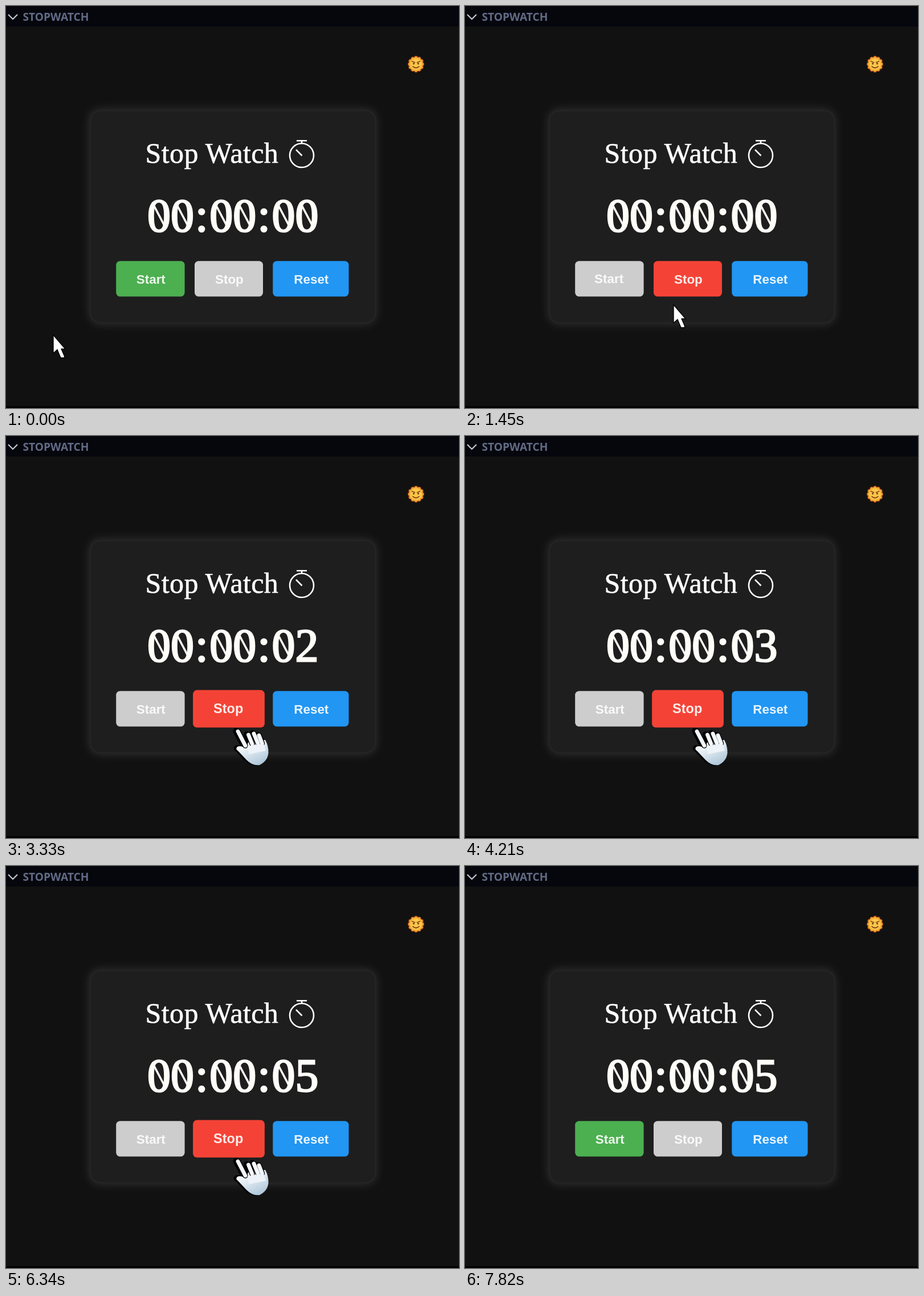
Recreate the animation shown at these times as an HTML page. Size 795 by 705 pixels, loop 7.9 s.

```html
<!DOCTYPE html>
<html lang="en">
<head>
<meta charset="utf-8">
<title>Stop Watch</title>
<style>
  html, body { margin: 0; width: 100%; height: 100%; overflow: hidden; background: #111; }
  svg { display: block; width: 100vw; height: 100vh; }
  .bar { font: 700 19.2px "Open Sans", sans-serif; fill: #626b86; }
  .title { font: 50px "Liberation Serif", serif; letter-spacing: .4px; fill: #fff; stroke: #fff; stroke-width: .6; }
  .time { font: 82px "Liberation Serif", serif; fill: #fffdf8; stroke: #fffdf8; stroke-width: 2.6; }
  .btn text { font: bold 22.4px "Liberation Sans", Arial, sans-serif; text-anchor: middle; }
</style>
</head>
<body>
<svg viewBox="0 0 795 705">
  <defs>
    <filter id="blur" x="-10%" y="-10%" width="120%" height="120%"><feGaussianBlur stdDeviation="8"/></filter>
    <linearGradient id="skin" x1=".2" y1="0" x2=".8" y2="1">
      <stop offset=".2" stop-color="#f4f8fb"/><stop offset="1" stop-color="#a9c3d6"/>
    </linearGradient>
    <path id="palm" d="M4 33Q0 37 5 40L20 56Q31 67 43 65Q57 58 58.5 44Q59 32 53 21L24 24L18 35Q9 30 4 33Z"/>
    <path id="fingers" d="M5 6L18 31M23.5 12L30 28M33 10L40 27M42 13L47.5 27"/>
  </defs>

  <rect width="795" height="705" fill="#111"/>
  <rect width="795" height="36" fill="#06070d"/>
  <rect y="702" width="795" height="3" fill="#000"/>
  <path d="M4 15L12 23L20 15" fill="none" stroke="#c3c6ce" stroke-width="2.2"/>
  <text class="bar" x="29.5" y="25.5">STOPWATCH</text>

  <g transform="translate(719.5 102)">
    <g id="rays" fill="#ee9430" stroke="#7a3010" stroke-width="1"></g>
    <circle r="12" fill="#f6b038"/>
    <circle r="9.8" fill="#fbc84a"/>
    <path d="M-7 -5L-2 -3M7 -5L2 -3M-5.5 4Q0 9 5.5 4" fill="none" stroke="#8a4715" stroke-width="1.7" stroke-linecap="round"/>
    <circle cx="-4" cy="-1" r="1.5" fill="#6b3510"/><circle cx="4" cy="-1" r="1.5" fill="#6b3510"/>
  </g>

  <rect x="146" y="181" width="504" height="377" rx="20" fill="#fff" opacity=".13" filter="url(#blur)"/>
  <rect x="148" y="183.5" width="500.5" height="372" rx="18" fill="#1e1e1e" stroke="#252525" stroke-width="2"/>

  <text class="title" x="244.5" y="275">Stop Watch</text>
  <g fill="none" stroke="#fff" stroke-width="2.6">
    <circle cx="519" cy="262" r="21"/>
    <path d="M510 236.3H528M519 236V241M519.5 262.5L509 252"/>
  </g>

  <text class="time" id="time" y="394.5"></text>
  <g id="slashes" stroke="#fffdf8" stroke-width="3.6"></g>

  <g id="buttons"></g>

  <g id="cursor">
    <path id="arrow" d="M0 0V32L7 25.5L13 40H19.5V37L14 24.5H21Z" fill="#fff" stroke="#000" stroke-width="1.3"/>
    <g id="hand" stroke-linecap="round" stroke-linejoin="round">
      <g transform="translate(-3 -.5)" stroke="#000">
        <use href="#palm" stroke-width="3"/>
        <use href="#fingers" stroke-width="11"/>
      </g>
      <use href="#palm" fill="url(#skin)"/>
      <use href="#fingers" stroke="#000" stroke-width="9.4"/>
      <use href="#fingers" stroke="#f4f8fb" stroke-width="6.8"/>
      <path d="M22 32L50 27L54 40L24 46Z" fill="#edf3f8"/>
    </g>
  </g>
</svg>
<script>
const LOOP = 7900, STEP = 97.7;
const START_AT = 1130, STOP_AT = 6390;
const NS = "http://www.w3.org/2000/svg";
const $ = id => document.getElementById(id);
const clamp = (v, lo = 0, hi = 1) => Math.min(hi, Math.max(lo, v));
const smooth = u => u * u * (3 - 2 * u);
const ramp = (t, from, to) => smooth(clamp((t - from) / (to - from)));
const pulse = (t, a, b, c, d) => ramp(t, a, b) - ramp(t, c, d);
const mix = (a, b, k) => `rgb(${a.map((v, i) => Math.round(v + (b[i] - v) * k))})`;

function add(parent, tag, attrs) {
  const el = document.createElementNS(NS, tag);
  for (const k in attrs) el.setAttribute(k, attrs[k]);
  return parent.appendChild(el);
}

for (let i = 0; i < 12; i++) {
  const a = i * Math.PI / 6;
  add($("rays"), "circle", { cx: 11 * Math.cos(a), cy: 11 * Math.sin(a), r: 3.4 });
}

// Left edges of the six digits; a colon follows each pair.
const digitX = [0, 1, 2, 3, 4, 5].map(i => 248 + i * 41 + Math.floor(i / 2) * 27.3);
const slashes = digitX.map(x =>
  add($("slashes"), "path", { d: `M${x + 10.5} 348L${x + 30.5} 386` }));
$("time").setAttribute("x", digitX.flatMap((x, i) => i === 1 || i === 3 ? [x, x + 43] : [x]));

const GREY = [205, 205, 205];
function makeButton(label, x, w, color) {
  const g = add($("buttons"), "g", { class: "btn" });
  const box = add(g, "rect", { rx: 7 });
  const text = add(g, "text", { fill: "#fff", "fill-opacity": .9 });
  text.textContent = label;
  return (on, hover, shift = hover) => {
    const grow = 2.9 * hover;
    box.setAttribute("x", x - grow);
    box.setAttribute("y", 447.2 - 1.6 * hover);
    box.setAttribute("width", w + 2 * grow);
    box.setAttribute("height", 62.4 + 3.2 * hover);
    box.setAttribute("fill", mix(GREY, color, on));
    text.setAttribute("transform",
      `translate(${x + w / 2 + .9 - 1.7 * shift} ${487.3 - 1.6 * shift}) scale(${1 + .05 * hover})`);
  };
}
const startBtn = makeButton("Start", 193.2, 120.4, [76, 175, 80]);
const stopBtn = makeButton("Stop", 331, 120, [244, 67, 54]);
const resetBtn = makeButton("Reset", 468.3, 133.2, [33, 150, 243]);

const path = [
  [230, 83, 577], [860, 233, 506], [1160, 233, 506], [1455, 366, 524],
  [1720, 402, 512], [6410, 402, 512], [7020, 225, 570], [7340, 4, 577], [7420, -60, 578]
];
function place(t) {
  const i = path.findIndex(p => p[0] > t);
  if (i === 0) return path[0].slice(1);
  if (i < 0) return path[path.length - 1].slice(1);
  const [t0, x0, y0] = path[i - 1], [t1, x1, y1] = path[i];
  const k = t0 < 7000 ? ramp(t, t0, t1) : (t - t0) / (t1 - t0);
  return [x0 + (x1 - x0) * k, y0 + (y1 - y0) * k];
}

function draw(ms) {
  const t = 970 + STEP * Math.floor((ms - 955) / STEP);

  const sec = clamp(Math.floor((t - 1100) / 950), 0, 5);
  const digits = "00000" + sec;
  $("time").textContent = digits.replace(/(..)(..)(..)/, "$1:$2:$3");
  slashes.forEach((s, i) => s.setAttribute("visibility", digits[i] === "0" ? "visible" : "hidden"));

  const running = pulse(t, START_AT, START_AT + 200, STOP_AT, STOP_AT + 200);
  startBtn(1 - running, pulse(t, 770, 950, START_AT, 1330), pulse(t, 770, 950, 1480, 1600));
  stopBtn(running, pulse(t, 1620, 1800, STOP_AT, STOP_AT + 200));
  resetBtn(1, 0);

  const pointing = (t > 770 && t < START_AT) || (t > 1620 && t < STOP_AT);
  $("hand").setAttribute("visibility", pointing ? "visible" : "hidden");
  $("arrow").setAttribute("visibility", pointing ? "hidden" : "visible");
  $("cursor").setAttribute("transform", `translate(${place(t)})`);
}

const begin = performance.now();
function tick() {
  draw((performance.now() - begin) % LOOP);
  requestAnimationFrame(tick);
}
tick();
</script>
</body>
</html>
```
